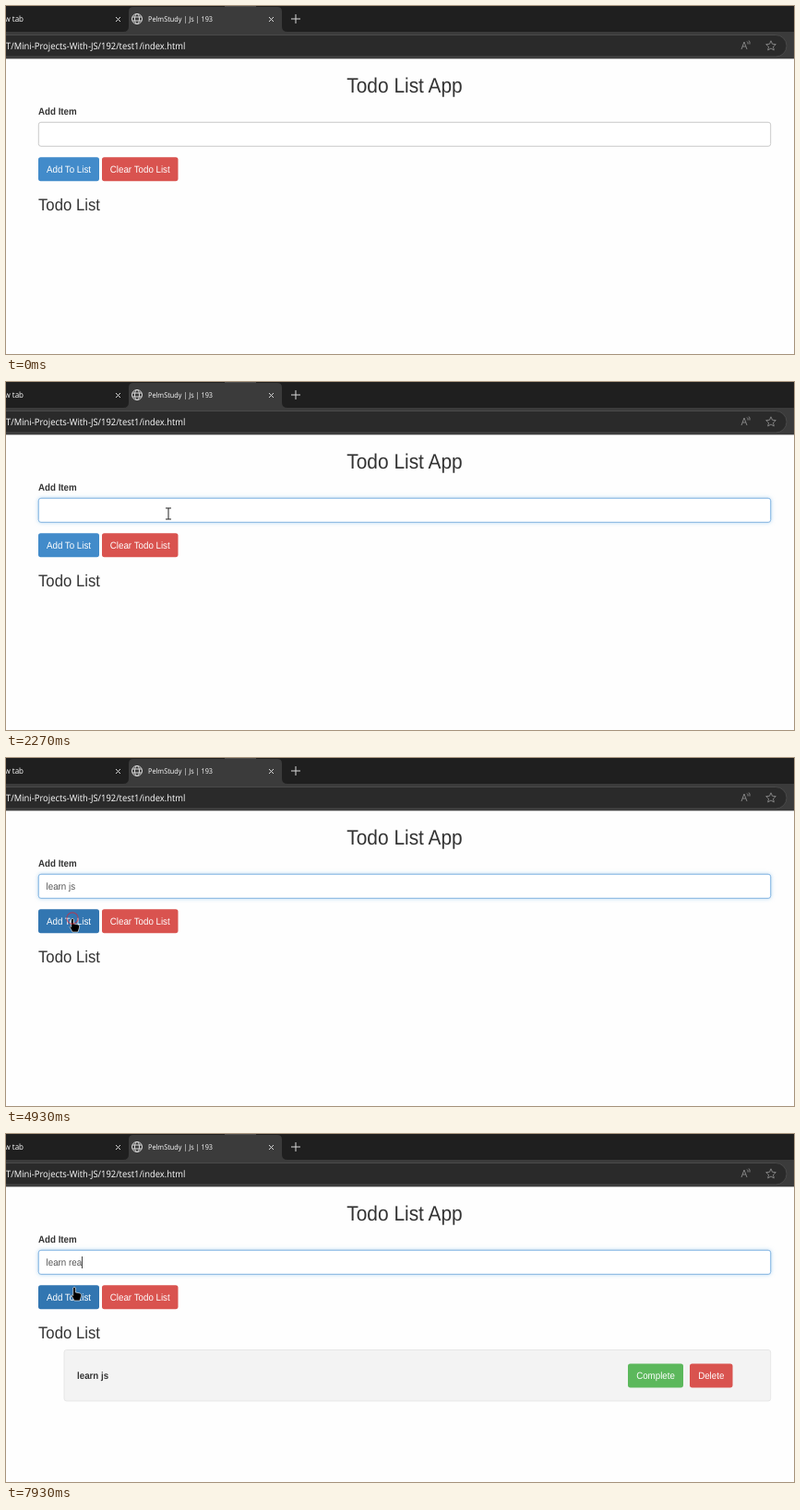
Animation, 854 px wide and 378 px high, one loop 8000 ms. Source, as an HTML page:

```html
<!DOCTYPE html>
<html lang="en">
<meta charset="utf-8">
<title>Todo List App</title>
<style>
html, body { margin: 0; width: 100%; height: 100%; overflow: hidden; background: #fefefe; }
svg { display: block; width: 854px; height: 378px; }
text { font-family: "Liberation Sans", Arial, sans-serif; fill: #333; white-space: pre; text-rendering: geometricPrecision; }
.ui { font-family: "Open Sans", "Noto Sans", sans-serif; fill: #fff; }
.bold { font-weight: bold; }
.btn { fill: #fff; }
.typed { fill: #555; }
.icon { fill: none; stroke: #d8d8d8; }
.dim { stroke: #8c8c8c; stroke-width: .9; }
.box { fill: #fff; stroke: #c4c4c4; stroke-width: .9; }
#glow { stroke: #7fb5e6; filter: drop-shadow(0 0 2px rgba(102, 175, 233, .5)); }
.cursor { fill: #000; stroke: #fff; stroke-width: .6; stroke-linejoin: round; }
</style>
<body>
<svg viewBox="0 0 854 378">
  <rect width="854" height="378" fill="#fefefe"/>
  <rect width="854" height="28" fill="#1f1f1f"/>
  <path d="M127 28Q133 28 133 22V6Q133 1 138 1H294Q299 1 299 6V22Q299 28 305 28Z" fill="#3b3b3b"/>
  <rect x="237" width="34" height="1" fill="#4a4a4a"/>
  <rect y="28" width="854" height="29.3" fill="#3b3b3b"/>
  <rect x="-30" y="31.5" width="876" height="23.5" rx="11.7" fill="#2a2a2a" stroke="#505050" stroke-width=".8"/>
  <g class="icon">
    <path d="M119 12l5 5m0-5l-5 5M285 12l5 5m0-5l-5 5M309 14h10m-5-5v10"/>
    <circle cx="142" cy="14" r="5.5"/>
    <ellipse cx="142" cy="14" rx="2.5" ry="5.5"/>
    <path d="M137 12h10m-10 4h10"/>
    <path class="dim" d="M797 47l3-8 3 8m-5-3h4M803 38.5q1.500 1 1 3m1-4q1.500 1 1 4"/>
    <path id="star" class="dim"/>
  </g>
  <g id="page">
    <rect class="box" x="35.3" y="126.3" width="793.4" height="26"  rx="2.6"/>
    <rect class="box" id="glow" x="35.3" y="126.3" width="793.4" height="26" rx="2.6"/>
  </g>
  <g id="item">
    <rect x="63" y="234.500" width="765.700" height="55.500" rx="2.6" fill="#f3f3f3" stroke="#e3e3e3" stroke-width=".8"/>
  </g>
  <rect id="caret" y="133" width=".9" height="13" fill="#333"/>
  <g id="mouse">
    <path id="arrow" class="cursor" d="M0 0V14L3 11 5.500 16.500 7.500 15.500 5 10.500H9Z"/>
    <path id="hand" class="cursor" d="M-1.300 1Q0-.7 1.300 1V6L6.500 7Q8 8 7.600 10L6 15H0L-3 9.500Q-2.500 8-1.300 9.500Z"/>
    <path id="beam" fill="none" stroke="#222" d="M-3-6H3M0-6V6M-3 6H3"/>
  </g>
  <circle id="ring" stroke="#e3202c" stroke-width="1.2"/>
</svg>
<script>
const SX = .6965, SY = .757, LOOP = 8000, STEP = 1000 / 15;
const FOCUS = 1740, ADDED = 5000, BLINK = 500, RING = 330, TEXT_X = 43.6;
const $ = id => document.getElementById(id);
const page = $('page'), item = $('item');

function add(parent, tag, attrs) {
  const el = document.createElementNS('http://www.w3.org/2000/svg', tag);
  set(el, attrs);
  return parent.appendChild(el);
}
function set(el, attrs) {
  for (const k in attrs) el.setAttribute(k, attrs[k]);
}
// The whole screen is slightly narrower than it is tall, text included.
function label(parent, x, y, size, str, cls = '', anchor = 'start') {
  const el = add(parent, 'text', {
    transform: `translate(${x} ${y}) scale(${SX} ${SY})`,
    'font-size': size, class: cls, 'text-anchor': anchor
  });
  el.textContent = str;
  return el;
}
function button(parent, x, y, w, str, fill) {
  const box = add(parent, 'rect', { x, y, width: w, height: 26, rx: 2.6, fill });
  label(parent, x + w / 2, y + 16.8, 14, str, 'btn', 'middle');
  return box;
}

const star = Array.from({ length: 10 }, (_, i) => {
  const r = i % 2 ? 2.6 : 5.6, a = i * Math.PI / 5;
  return [829 + r * Math.sin(a), 43.4 - r * Math.cos(a)];
});
$('star').setAttribute('d', 'M' + star.join('L') + 'Z');

label(page, 19, 17.2, 11.5, 'w tab', 'ui', 'end');
label(page, 154, 17.2, 10.5, 'PelmStudy | Js | 193', 'ui');
label(page, 194.5, 46.5, 13.5, 'T/Mini-Projects-With-JS/192/test1/index.html', 'ui', 'end');
label(page, 432, 94.3, 30, 'Todo List App', '', 'middle');
label(page, 35, 118.3, 14, 'Add Item', 'bold');
label(page, 35, 222.3, 24, 'Todo List');
const field = label(page, TEXT_X, 143.2, 14, '', 'typed');
const addBtn = button(page, 35, 164.2, 66, 'Add To List', '#428bca');
const clearBtn = button(page, 104, 164.2, 82.5, 'Clear Todo List', '#d9534f');
label(item, 77, 265.5, 14, 'learn js', 'bold');
button(item, 674, 249.4, 60, 'Complete', '#5cb85c');
button(item, 741, 249.4, 46.5, 'Delete', '#d9534f');

// Each move bends from the previous resting place through a control point.
const entry = [845, 32];
const moves = [
  { from: 530, to: 670, via: [608, 94], end: [371, 155] },
  { from: 1070, to: 1670, via: [270, 282], end: [183, 144] },
  { from: 1930, to: 2140, via: [180, 158], end: [176, 143] },
  { from: 4200, to: 4800, via: [150, 240], end: [72, 174] },
  { from: 5600, to: 5760, via: [72, 170], end: [74, 166] }
];
const bursts = [
  { from: 2470, to: 2800, text: 'learn' },
  { from: 3000, to: 3330, text: ' js' },
  { from: 6400, to: 6930, text: 'learn ' },
  { from: 7800, to: 7930, text: 'rea' }
];
const clicks = [moves[1], moves[3]].map(m => ({ at: m.to, pos: m.end }));

const show = (el, on) => el.style.display = on ? '' : 'none';
const clamp = k => Math.min(1, Math.max(0, k));
const part = (t, span) => clamp((t - span.from) / (span.to - span.from));
const ease = k => k * k * k * (k * (6 * k - 15) + 10);

function mouseAt(t) {
  let pos = entry;
  for (const m of moves) {
    const k = ease(part(t, m)), j = 1 - k;
    pos = pos.map((p, i) => j * j * p + 2 * j * k * m.via[i] + k * k * m.end[i]);
  }
  return pos;
}

function typedAt(t) {
  return bursts
    .filter(b => b.from <= t && (b.from > ADDED || t < ADDED))
    .map(b => b.text.slice(0, 1 + Math.floor((b.text.length - 1) * part(t, b))))
    .join('');
}

// The caret starts a new blink after focus and after every key.
function caretOn(t) {
  const resets = [FOCUS, ADDED, ...bursts.map(b => b.from <= t ? Math.min(t, b.to) : 0)];
  const last = Math.max(0, ...resets.filter(r => r <= t));
  return t >= FOCUS && Math.floor((t - last) / BLINK) % 2 === 0;
}

function drawMouse(t) {
  const [x, y] = mouseAt(t), visible = t >= moves[0].from;
  const within = (l, top, r, b) => visible && x >= l && x <= r && y >= top && y <= b;
  const onField = within(35, 126, 829, 153);
  const onAdd = within(35, 164, 101, 190), onClear = within(104, 164, 187, 190);
  show($('mouse'), visible);
  $('mouse').setAttribute('transform', `translate(${x} ${y})`);
  show($('beam'), onField);
  show($('hand'), onAdd || onClear);
  show($('arrow'), !onField && !onAdd && !onClear);
  addBtn.setAttribute('fill', onAdd ? '#3276b1' : '#428bca');
  clearBtn.setAttribute('fill', onClear ? '#d2322d' : '#d9534f');
}

function drawRing(t) {
  const click = clicks.find(c => t >= c.at && t < c.at + RING);
  show($('ring'), click);
  if (!click) return;
  const k = (t - click.at) / RING;
  set($('ring'), {
    cx: click.pos[0], cy: click.pos[1], r: 2 + 10 * k,
    fill: k < .1 ? '#e3202c' : 'none', opacity: 1 - k
  });
}

function draw(now) {
  // The screen refreshes 15 times a second.
  const t = Math.floor((now + 4) / STEP) * STEP + 4;
  field.textContent = typedAt(t);
  $('caret').setAttribute('x', TEXT_X + field.getComputedTextLength() * SX);
  show($('caret'), caretOn(t));
  $('glow').setAttribute('opacity', clamp((t - FOCUS) / 150));
  show(item, t >= ADDED);
  drawMouse(t);
  drawRing(t);
}

const start = performance.now();
function frame() {
  draw((performance.now() - start) % LOOP);
  requestAnimationFrame(frame);
}
frame();
</script>
</body>
</html>
```
